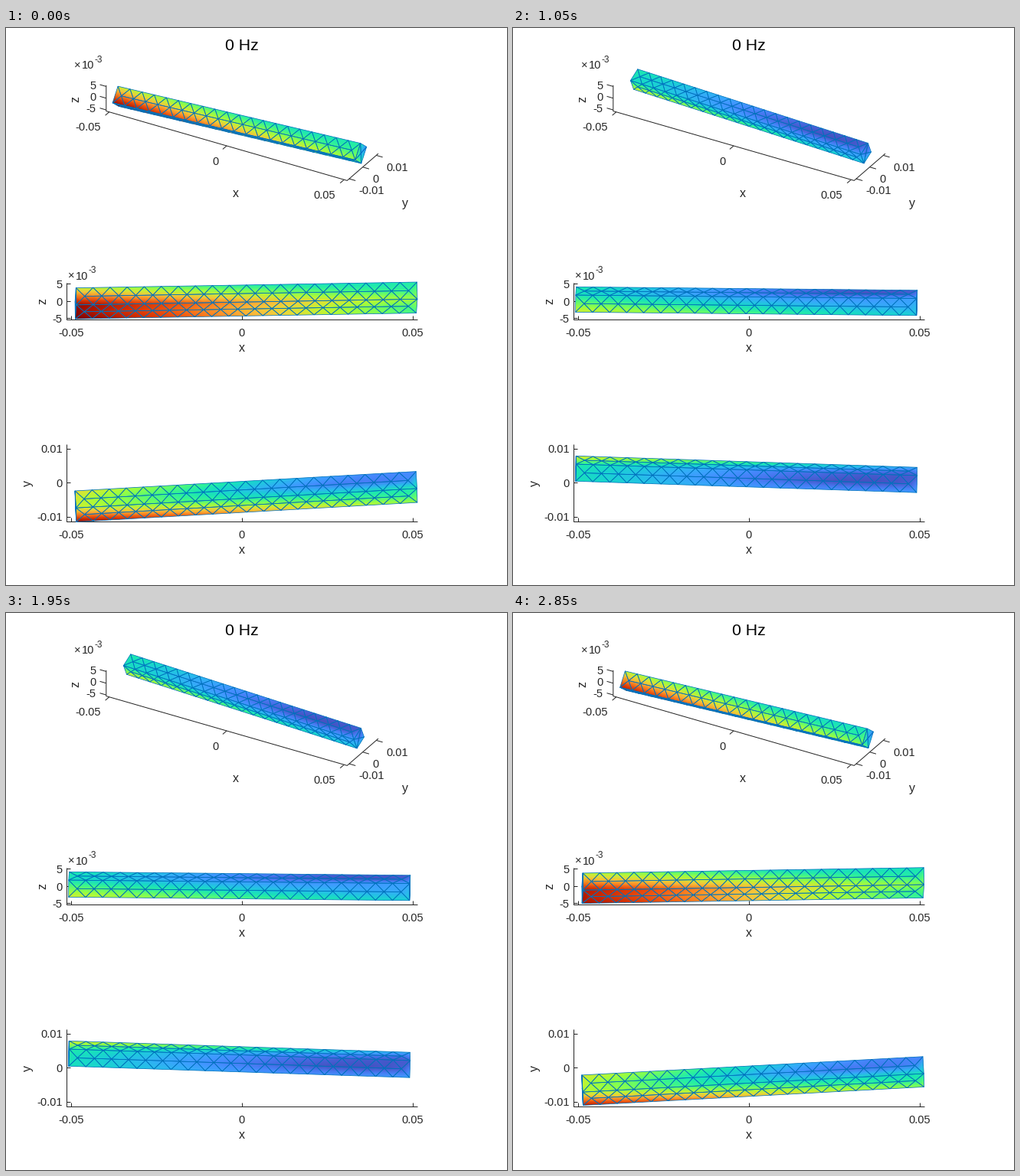
These frames come from a looping animation (654 by 728 pixels, 3 s). A matplotlib script:

```python
import numpy as np
import matplotlib.pyplot as plt
from matplotlib.animation import FuncAnimation
from matplotlib.collections import LineCollection
from matplotlib.path import Path

W, H, DPI = 654, 728, 100
FRAMES, INTERVAL = 20, 150
PX = 72 / DPI                      # points per pixel
INK = (0.15, 0.15, 0.15)
EDGE = (0, 0.447, 0.741)
FLAT = 4452                        # pixels per metre in the side views

plt.rcParams["font.family"] = "Liberation Sans"
fig = plt.figure(figsize=(W / DPI, H / DPI), dpi=DPI, facecolor="white")
ax = fig.add_axes([0, 0, 1, 1])
ax.set_xlim(0, W)
ax.set_ylim(H, 0)
ax.axis("off")
ax.autoscale(False)


# --- bar mesh -------------------------------------------------------------
HALF, A, CELLS = 0.05, 0.0025, 20


def bar_triangles():
    """Surface triangles of the bar, wound so that they face outwards."""
    xs = np.linspace(-HALF, HALF, CELLS + 1)
    corners = A * np.array([(-1, -1), (1, -1), (1, 1), (-1, 1)])
    tris = []
    for i in range(4):
        p, q = corners[i], corners[(i + 1) % 4]
        m = (p + q) / 2
        mids = [(x, *m) for x in (xs[:-1] + xs[1:]) / 2]
        for k, mid in enumerate(mids):
            for e in (p, q):
                tris.append([(xs[k], *e), (xs[k + 1], *e), mid])
                if k:
                    tris.append([mids[k - 1], mid, (xs[k], *e)])
        for x, mid in ((xs[0], mids[0]), (xs[-1], mids[-1])):
            tris.append([(x, *p), (x, *q), mid])
            tris.append([(x, *p), (x, *q), (x, 0, 0)])
    tris = np.array(tris, float)
    normal = np.cross(tris[:, 1] - tris[:, 0], tris[:, 2] - tris[:, 0])
    inward = (normal * tris.mean(axis=1)).sum(axis=1) < 0
    tris[inward] = tris[inward][:, ::-1]
    return tris


def refine(t):
    """Split every triangle into four."""
    a, b, c = t[:, 0], t[:, 1], t[:, 2]
    ab, bc, ca = (a + b) / 2, (b + c) / 2, (c + a) / 2
    parts = [(a, ab, ca), (ab, b, bc), (ca, bc, c), (ab, bc, ca)]
    return np.concatenate([np.stack(p, axis=1) for p in parts])


# linearised rigid motion: shift plus small rotation
SHIFT = np.array([5.6, -18.45, 0.6]) / FLAT
SPIN = np.array([-0.82, -0.017, 0.057])

coarse = bar_triangles()
mode = SHIFT + np.cross(SPIN, coarse)
size = np.linalg.norm(mode, axis=2, keepdims=True)
PEAK = size.max()
coarse = np.concatenate([coarse, mode, size], axis=2)
fine = refine(coarse)


# --- views ----------------------------------------------------------------
class View:
    def __init__(self, origin, right, up):
        self.origin = np.array(origin, float)
        self.axes = np.array([right, -np.array(up, float)]).T

    def __call__(self, p):
        return self.origin + np.asarray(p, float) @ self.axes


S, R = 3540, np.radians(30)
C, D = S * np.cos(R), S * np.sin(R)
solid = View((308.4, 119.5), (C, D, 0), (-D / 2, C / 2, C))
side = View((307.9, 356.7), (FLAT, 0, 0), (0, 0, FLAT))
top = View((307.9, 594.1), (FLAT, 0, 0), (0, FLAT, 0))
VIEWS = (solid, side, top)


# --- static axes and text -------------------------------------------------
def line(*pts):
    x, y = zip(*pts)
    ax.plot(x, y, color=INK, lw=PX, zorder=1, solid_capstyle="butt")


def text(x, y, s, px=14.67, ha="center", color=INK, mid=0.355):
    """Text whose glyphs are centred vertically on y."""
    ax.text(x, y + mid * px, s, fontsize=px * PX, ha=ha, va="baseline",
            color=color)


def label(x, y, s, upright=False):
    drop = 2.5 if s == "y" else 4.2
    dx, dy = (drop, 0) if upright else (0, drop)
    ax.text(x + dx, y + dy, s, fontsize=16 * PX, ha="center", va="baseline",
            rotation=90 if upright else 0, rotation_mode="anchor", color=INK)


def power(x, y):
    text(x, y, "×", ha="left", mid=0.3)
    text(x + 10.5, y, "10", ha="left")
    text(x + 27, y - 7.5, "-3", px=11.7, ha="left")


def flat_axes(view, base, peak, ticks, vertical):
    left, right = 79, 537
    line((left, peak), (left, base), (right, base))
    for v, s in ((-0.05, "-0.05"), (0, "0"), (0.05, "0.05")):
        x = view((v, 0, 0))[0]
        line((x, base), (x, base - 4.6))
        text(x, base + 16.3, s)
    for v, s in ticks:
        y = view((0, v, v))[1]
        line((left, y), (left + 4.6, y))
        text(73.5, y + 0.6, s, ha="right")
    label(308, base + 38, "x")
    label(*vertical, upright=True)


def solid_axes():
    X, Y, Z = 0.0513, 0.0115, 0.0055
    line(*(solid(p) for p in ((-X, -Y, Z), (-X, -Y, -Z),
                              (X, -Y, -Z), (X, Y, -Z))))
    ends = {"x": (0, -0.0029, 0), "y": (0.0027, 0, 0), "z": (-0.0027, 0, 0)}

    def tick(p, axis):
        line(solid(p), solid(np.add(p, ends[axis])))

    for v, s, pos in ((-0.05, "-0.05", (107, 128.5)), (0, "0", (273, 174)),
                      (0.05, "0.05", (416, 218))):
        tick((v, -Y, -Z), "x")
        text(*pos, s)
    for v, s, pos in ((-0.01, "-0.01", (460, 212)), (0, "0", (478, 197)),
                      (0.01, "0.01", (496, 181.5))):
        tick((X, v, -Z), "y")
        text(*pos, s, ha="left")
    for v, s, y in ((-0.005, "-5", 104.5), (0, "0", 89.5), (0.005, "5", 74.5)):
        tick((-X, -Y, v), "z")
        text(117.5, y, s, ha="right")
    power(88.5, 48)
    label(300, 217, "x")
    label(521, 231.5, "y")
    label(91.5, 93, "z", upright=True)


text(308, 21.5, "0 Hz", px=21.33, color="black")
solid_axes()
flat_axes(side, 381, 332.5,
          ((-0.005, "-5"), (0, "0"), (0.005, "5")), (48, 357.5, "z"))
flat_axes(top, 645, 543.5,
          ((-0.01, "-0.01"), (0, "0"), (0.01, "0.01")), (30, 595, "y"))
power(80.5, 323.5)


# --- animation ------------------------------------------------------------
drawn = []


def visible(view, tris, c):
    """Projected triangles that face the viewer, with their colour values."""
    p = view(tris[..., :3] + c * tris[..., 3:6])
    u, v = p[:, 1] - p[:, 0], p[:, 2] - p[:, 0]
    front = u[:, 0] * v[:, 1] - u[:, 1] * v[:, 0] < -1e-6
    return p[front], abs(c) * tris[front, :, 6]


def update(i):
    while drawn:
        drawn.pop().remove()
    c = np.cos(2 * np.pi * i / FRAMES)
    for view in VIEWS:
        p, value = visible(view, fine, c)
        index = np.arange(p.shape[0] * 3).reshape(-1, 3)
        fill = ax.tripcolor(
            p[..., 0].ravel(), p[..., 1].ravel(), value.ravel(),
            triangles=index, shading="gouraud", cmap="turbo",
            vmin=0, vmax=PEAK, zorder=2)
        p, _ = visible(view, coarse, c)
        # keep the smooth shading inside the silhouette
        fill.set_clip_path(Path.make_compound_path_from_polys(p),
                           ax.transData)
        loops = p[:, [0, 1, 2, 0]]
        edges = ax.add_collection(
            LineCollection(loops, colors=[EDGE], linewidths=0.75 * PX,
                           zorder=3), autolim=False)
        drawn.extend((fill, edges))
    return drawn


anim = FuncAnimation(fig, update, frames=FRAMES, interval=INTERVAL,
                     init_func=lambda: [], repeat=True, repeat_delay=0,
                     blit=False)
plt.show()
```
